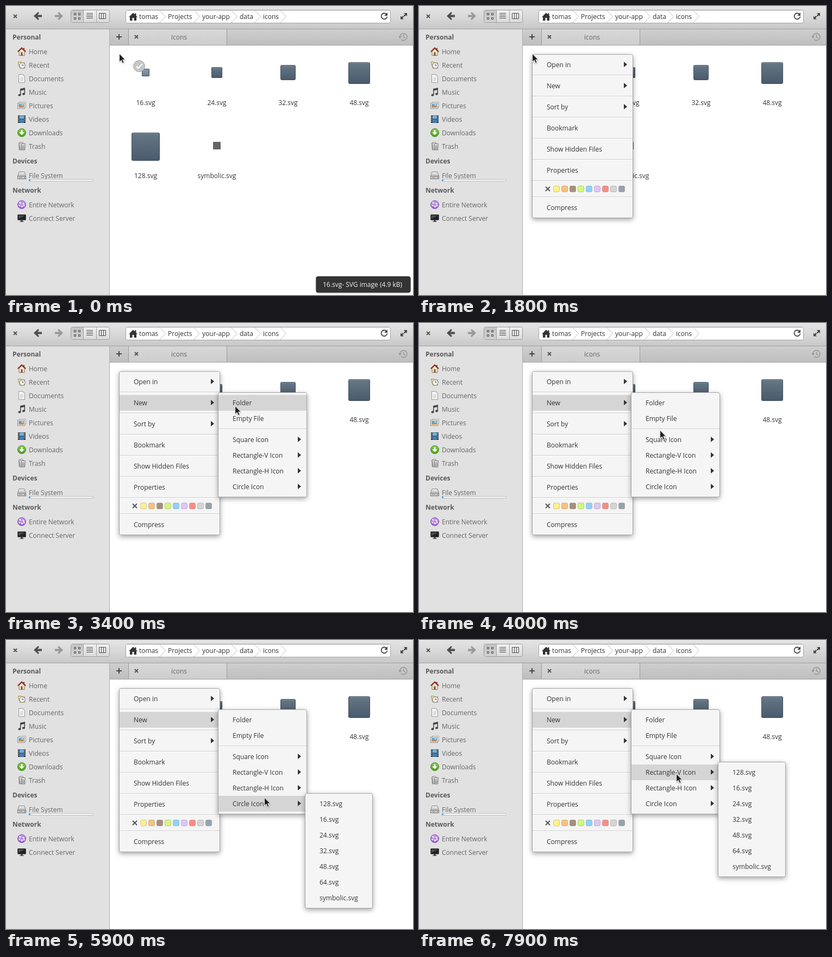
Write an HTML page that moves like this. It is 749 by 534 pixels and loops after 8000 ms.

```html
<!DOCTYPE html>
<html lang="en">
<head>
<meta charset="utf-8">
<title>File manager menu</title>
<style>
html, body { margin: 0; width: 100%; height: 100%; overflow: hidden; background: #fff; }
svg { display: block; font: 12px "Open Sans", "Noto Sans", sans-serif; }
text { white-space: pre; }
.menu { filter: drop-shadow(0 3px 5px rgba(0,0,0,.36)); }
</style>
</head>
<body>
<svg id="stage" width="749" height="534" viewBox="0 0 749 534"></svg>
<script>
const LOOP = 8000, STEP = 100;
const stage = document.getElementById('stage');

// ---- drawing helpers ----
const rect = (x, y, w, h, fill, more = '') =>
  `<rect x="${x}" y="${y}" width="${w}" height="${h}" fill="${fill}" ${more}/>`;
const path = (d, fill, more = '') => `<path d="${d}" fill="${fill}" ${more}/>`;
const line = (d, color, width = 1, more = '') =>
  path(d, 'none', `stroke="${color}" stroke-width="${width}" ${more}`);
const text = (x, y, s, fill = '#333', more = '') =>
  `<text x="${x}" y="${y}" fill="${fill}" ${more}>${s}</text>`;
const circle = (x, y, r, fill, more = '') =>
  `<circle cx="${x}" cy="${y}" r="${r}" fill="${fill}" ${more}/>`;
const group = (body, more) => `<g ${more}>${body}</g>`;
const at = (x, y, body) => group(body, `transform="translate(${x} ${y})"`);
const gradient = (id, ...colors) =>
  `<linearGradient id="${id}" x2="0" y2="1">` + colors.map((c, i) =>
    `<stop offset="${i / (colors.length - 1)}" stop-color="${c}"/>`).join('') + '</linearGradient>';
const cross = (x, y, r, color) =>
  line(`M${x - r} ${y - r}l${2 * r} ${2 * r}m0 ${-2 * r}l${-2 * r} ${2 * r}`, color, 2);

const defs = '<defs>' +
  gradient('bar', '#e4e4e4', '#d8d8d8', '#c7c7c7') +
  gradient('tabs', '#cecece', '#bfbfbf') +
  gradient('tab', '#d8d8d8', '#cdcdcd') +
  gradient('button', '#f1f1f1', '#dadada') +
  gradient('pressed', '#c4c4c4', '#d2d2d2') +
  gradient('slate', '#667785', '#485a6c') +
  gradient('slateHover', '#8b9cac', '#6d8095') +
  gradient('green', '#86cc4e', '#4d9d1c') +
  gradient('purple', '#c79cf0', '#9259c8') +
  gradient('metal', '#f4f4f4', '#b8b8b8') + '</defs>';

// ---- top bar ----
function toolbar() {
  const ink = '#4d4d4d';
  const arrow = 'M0 0l8-7.5 2 2-3.2 3.5H15v4H6.800l3.200 3.500-2 2z';
  let s = rect(0, 0, 749, 43, 'url(#bar)') + rect(0, 0, 749, 1, '#eee') + rect(0, 42, 749, 1, '#a0a0a0');
  s += cross(17, 19, 3, '#555');
  s += at(51, 18.5, path(arrow, ink));
  s += group(path(arrow, '#989898'), 'transform="translate(105 18.5) scale(-1 1)"');
  s += rect(119.5, 7.5, 71, 23, 'url(#button)', 'rx="3" stroke="#9c9c9c"');
  s += path('M142 8H122.500q-2.500 0-2.500 2.500v17q0 2.500 2.500 2.500H142z', 'url(#pressed)');
  s += line('M142.500 8v22M166.500 8v22', '#a3a3a3');
  for (const x of [125.5, 133.5]) for (const y of [13.5, 21.5])
    s += rect(x, y, 3, 3, 'none', `stroke="${ink}"`);
  s += line('M148 13.500h12m-12 3h12m-12 3h12m-12 3h12', ink);
  s += line('M171.500 13.500h12v10h-12zm4 0v10m4-10v10', ink);

  s += rect(220.5, 7.5, 487, 24, '#fff', 'rx="3" stroke="#a2a2a2"') + line('M222 8.500h484', '#e2e2e2');
  s += path('M226 20.500l8-8 3 3v-2h2.500v4.500l2.500 2.500h-2v6.500h-4.500v-5h-3v5H228v-6.500z', '#333');
  const crumbs = [[245, 'tomas'], [298, 'Projects'], [361, 'your-app'], [430, 'data'], [473, 'icons']];
  crumbs.forEach(([x, name]) => s += text(x, 24, name));
  for (const x of [282.5, 345.5, 414.5, 457.5, 504.5])
    s += line(`M${x} 8l11 11.500-11 11.500`, '#bcbcbc');
  s += line('M700.500 15.500a5.500 5.500 0 1 0 1 4', '#444', 1.8) + path('M702 12v6h-6z', '#444');
  s += path('M738 13v6l-2-2-2.500 2.500-1.700-1.700 2.500-2.500-2.300-2.300zM726 24.500v-6l2 2 2.500-2.500 1.700 1.700-2.500 2.500 2.300 2.300z', '#444');
  return s;
}

function tabBar() {
  let s = rect(191, 43, 558, 29, 'url(#tabs)') + rect(191, 72, 558, 1, '#a3a3a3');
  s += rect(226, 43, 180, 29, 'url(#tab)') + line('M225.500 43v29M406.500 43v29', '#9b9b9b');
  s += line('M208 52v10m-5-5h10', '#444', 2) + cross(240, 57, 3, '#555');
  s += text(318.5, 62, 'icons', '#666', 'text-anchor="middle"');
  s += line('M725 57a6.500 6.500 0 1 1 2 4.700', '#969696', 1.5) + path('M722 56h6l-3 4z', '#969696');
  s += line('M731.500 53v4.500l3 1.500', '#969696', 1.4);
  return s;
}

// ---- sidebar, icons drawn in a 16 px box ----
const icons = {
  home: path('M3 8l5-5 5 5v7.500H3z', '#f1e6d2', 'stroke="#8b6f4f"') + rect(6.5, 9.500, 3, 6, '#7d4f2c') +
    rect(11, 1.500, 2, 4, '#8a3a23') + line('M.7 8.500L8 1.500l7.300 7', '#8f3421', 2),
  recent: path('M1.500 4.500v-2h5l1 1.500h6v10h-9z', '#efdca6', 'stroke="#a68a4b"') +
    circle(9, 9, 5.2, '#f8f8f8', 'stroke="#777"') + line('M9 6v3.500l3-1.500', '#555'),
  page: path('M2.500.5h8l3 3v12h-11z', '#f7f7f7', 'stroke="#999"') + line('M10.500.5v3h3M5 6.500h6m-6 2h6m-6 2h6m-6 2h4', '#c4c4c4'),
  music: path('M5 2l9-2v11.500a2.500 2 0 1 1-1.500-1.800V4l-6 1.400v8.100A2.500 2 0 1 1 5 11.700z', '#444'),
  picture: rect(3.500, 1.500, 12, 9, '#fff', 'stroke="#aaa"') + rect(.5, 3.500, 13, 10, '#fff', 'stroke="#888"') +
    rect(2, 5, 10, 7, '#5d9fd6') + path('M2 12V9.500l3-2 3 2 2-1 2 1V12z', '#c79055') + circle(9, 7, 1.300, '#f6e27a'),
  video: rect(1, 1, 14, 14, '#333') + rect(4, 1.500, 8, 6, '#69b5ea') + rect(4, 8.500, 8, 6, '#3d83c0') +
    line('M2.500 2v12M13.500 2v12', '#ddd', 1.400, 'stroke-dasharray="1.500 1.500"'),
  down: circle(8, 8, 7.500, 'url(#green)', 'stroke="#458e1b"') + path('M6.500 3.500h3v4H13L8 12.500 3 7.500h3.500z', '#fff'),
  trash: path('M2.500 2.500l5-1v13l-4 .5zM7.500 3.500h7l-1 11.500h-6z', 'url(#metal)', 'stroke="#777"') +
    line('M4.500 4v9M9.500 6v7M11.800 6v7', '#888') + path('M3 2l4-1.500 4 1-3 2z', '#eee', 'stroke="#888"'),
  disk: path('M3 1.500h10l2.500 8H.5z', 'url(#metal)', 'stroke="#888"') +
    rect(.5, 9.500, 15, 5, '#cfcfcf', 'stroke="#777"') + line('M3 12h6', '#777') + circle(13, 12, 1, '#666'),
  globe: circle(8, 8, 7.500, 'url(#purple)', 'stroke="#8550b5"') +
    line('M4.500 4.500l7 1.500-3 6-4-7.500m7 1.500l1 4-4 2-5-2.500', '#f1e4fc', 1) +
    [[4.500, 4.500], [11.500, 6], [8.500, 12], [12.500, 10], [3.500, 9.500]].map(p => circle(...p, 1.200, '#fff')).join(''),
  screen: rect(.5, 1.500, 15, 10, '#222', 'rx="1" stroke="#555"') + path('M2 3h12L2 9z', '#4b4b4b') +
    rect(6, 12, 4, 2, '#444') + rect(4, 14, 8, 1, '#555')
};

function sidebar() {
  let s = rect(0, 43, 190, 491, '#e1e1e1') + rect(190, 43, 1, 491, '#adadad');
  const heads = [[62, 'Personal'], [291, 'Devices'], [345, 'Network']];
  heads.forEach(([y, name]) => s += text(12, y, name, '#5a5a5a', 'font-weight="700"'));
  const places = [[84, 'Home', 'home'], [109, 'Recent', 'recent'], [134, 'Documents', 'page'],
    [159, 'Music', 'music'], [184, 'Pictures', 'picture'], [209, 'Videos', 'video'],
    [234, 'Downloads', 'down'], [259, 'Trash', 'trash'], [313, 'File System', 'disk'],
    [367, 'Entire Network', 'globe'], [392, 'Connect Server', 'screen']];
  for (const [y, name, icon] of places)
    s += at(21, y - 8, icons[icon]) + text(42, y + 5, name, '#666');
  s += rect(42.5, 320.5, 118, 3, '#fff', 'rx="1.500" stroke="#b9b9b9"') + rect(42, 320, 3, 4, '#5aa7e2', 'rx="1"');
  return s;
}

// ---- file grid ----
const label = (x, y, s) => text(x, y, s, '#333', 'text-anchor="middle"');
function tile(x, y, size, fill = 'url(#slate)') {
  const h = size / 2;
  return rect(x - h + .5, y - h + .5, size - 1, size - 1, fill, `rx="${size > 20 ? 2 : 1}" stroke="#3f4f5e"`) +
    line(`M${x - h + 2} ${y - h + 1.500}h${size - 4}`, '#8493a0');
}
function files() {
  const list = [[257, 123, 14, '16'], [388, 123, 20, '24'], [519, 123, 28, '32'],
    [650, 124, 40, '48'], [257, 260, 52, '128']];
  let s = rect(191, 73, 558, 461, '#fff');
  for (const [x, y, size, name] of list) s += tile(x, y, size) + label(x, y < 200 ? 183 : 318, name + '.svg');
  s += rect(381, 251, 14, 14, '#666', 'rx="1"') + label(388, 318, 'symbolic.svg');
  s += group(tile(257, 123, 14, 'url(#slateHover)') +
    circle(245, 111, 10.500, '#c6c6c6', 'stroke="#a8a8a8"') +
    line('M240 111.500l3.500 3.500 7-8', '#fff', 2.500), 'id="hover"');
  return s;
}

const info = () => group(
  rect(571, 500, 173, 29, '#333', 'rx="3" stroke="#222" style="filter:drop-shadow(0 1px 1px rgba(0,0,0,.35))"') +
  text(583, 519, '16.svg- SVG image (4.9 kB)', '#f4f4f4'), 'id="info"');

// ---- menus: rows are [centre y, label, has submenu] ----
const mainRows = [[108, 'Open in', 1], [147, 'New', 1], [186, 'Sort by', 1], [225, 'Bookmark'],
  [264, 'Show Hidden Files'], [303, 'Properties'], [372, 'Compress']];
const newRows = [[147, 'Folder'], [176, 'Empty File'], [215, 'Square Icon', 1],
  [244, 'Rectangle-V Icon', 1], [273, 'Rectangle-H Icon', 1], [302, 'Circle Icon', 1]];
const sizeRows = ['128', '16', '24', '32', '48', '64', 'symbolic'].map((n, i) => [302 + 29 * i, n + '.svg']);

function menu(id, x, y, w, h, rows, seps, extra = '') {
  let s = rect(x + .5, y + .5, w - 1, h - 1, '#f5f5f5', 'rx="3" stroke="#a4a4a4" class="menu"');
  s += rect(x + 1, 0, w - 2, 29, '#d5d5d5', `id="${id}Lit" visibility="hidden"`);
  for (const sy of seps) s += rect(x + 1, sy, w - 2, 1, '#cdcdcd') + rect(x + 1, sy + 1, w - 2, 1, '#fff');
  for (const [cy, name, sub] of rows) {
    s += text(x + 27, cy + 5, name);
    if (sub) s += path(`M${x + w - 17} ${cy - 5}l6 5-6 5z`, '#333');
  }
  return group(s + extra, `id="${id}" opacity="0"`);
}

function swatches() {
  const colors = ['#fff08c', '#fac17c', '#a78e7d', '#d0fa7b', '#8fd2fb', '#e0c5f8', '#fd8b84', '#d5d5d5', '#98a2ac'];
  return cross(237, 338, 4, '#555') + colors.map((c, i) =>
    rect(247.5 + 15 * i, 332.5, 11, 11, c, 'rx="2.500" stroke="#000" stroke-opacity=".18"')).join('');
}

stage.innerHTML = defs + files() + tabBar() + sidebar() + toolbar() + info() +
  menu('main', 208, 89, 186, 303, mainRows, [127, 166, 205, 244, 283, 322, 352], swatches()) +
  menu('sub', 390, 128, 164, 194, newRows, [195]) +
  menu('sizes', 550, 283, 125, 213, sizeRows, []) +
  group(path('M.5 0V15.500l3.600-3.300 2.500 5.600 2.700-1.200-2.500-5.400h4.700z', '#1f1f1f',
    'stroke="#fff" stroke-width="1" style="filter:drop-shadow(0 1px 1px rgba(0,0,0,.3))"'), 'id="cursor"');

// ---- motion ----
const el = id => document.getElementById(id);
const parts = {};
for (const id of ['hover', 'info', 'main', 'mainLit', 'sub', 'subLit', 'sizes', 'cursor']) parts[id] = el(id);

// time, x, y of the pointer tip
const route = [[1800, 208, 88], [2400, 268, 143], [3000, 268, 143], [3400, 421, 153], [3700, 432, 167],
  [3800, 432, 167], [4400, 474, 288], [4700, 475, 293], [5800, 475, 293], [5900, 475, 291],
  [6100, 473, 274], [7300, 473, 274], [7500, 473, 263], [7600, 473, 256], [7900, 473, 247]];

function pointer(t) {
  const i = route.findIndex(k => k[0] > t);
  if (i < 0) return route[route.length - 1].slice(1);
  if (i === 0) return route[0].slice(1);
  const [t0, x0, y0] = route[i - 1], [t1, x1, y1] = route[i];
  let p = (t - t0) / (t1 - t0);
  if (t1 - t0 > 300) p = p * p * (3 - 2 * p);
  return [Math.round(x0 + (x1 - x0) * p), Math.round(y0 + (y1 - y0) * p)];
}

// opening start, close time, vertical shift
const sizeShows = [[4700, 6000, 0], [6300, 7600, -29], [7800, LOOP, -58]];
const fade = (t, start) => t < start ? 0 : t < start + STEP ? .6 : 1;
const show = (node, on) => node.setAttribute('visibility', on ? 'visible' : 'hidden');
const rowAt = (rows, y) => rows.find(r => y >= r[0] - 14 && y < r[0] + 15);

function light(node, row) {
  show(node, row);
  if (row) node.setAttribute('y', row[0] - 14);
}

function draw(t) {
  const [x, y] = pointer(t), subOpen = t >= 2800;
  parts.cursor.setAttribute('transform', `translate(${x} ${y})`);
  show(parts.hover, t < 400);
  show(parts.info, t < 400 || t >= 600 && t < 1400);
  parts.main.setAttribute('opacity', fade(t, 1400));
  parts.sub.setAttribute('opacity', subOpen ? 1 : 0);
  light(parts.mainLit, subOpen ? mainRows[1] : t >= 1400 && rowAt(mainRows, y));
  light(parts.subLit, subOpen && x > 390 && rowAt(newRows, y));
  const open = sizeShows.find(([a, b]) => t >= a && t < b);
  parts.sizes.setAttribute('opacity', open ? fade(t, open[0]) : 0);
  if (open) parts.sizes.setAttribute('transform', `translate(0 ${open[2]})`);
}

function tick() {
  const t = performance.now() % LOOP;
  draw(Math.floor(t / STEP) * STEP);
  requestAnimationFrame(tick);
}
tick();
</script>
</body>
</html>
```
